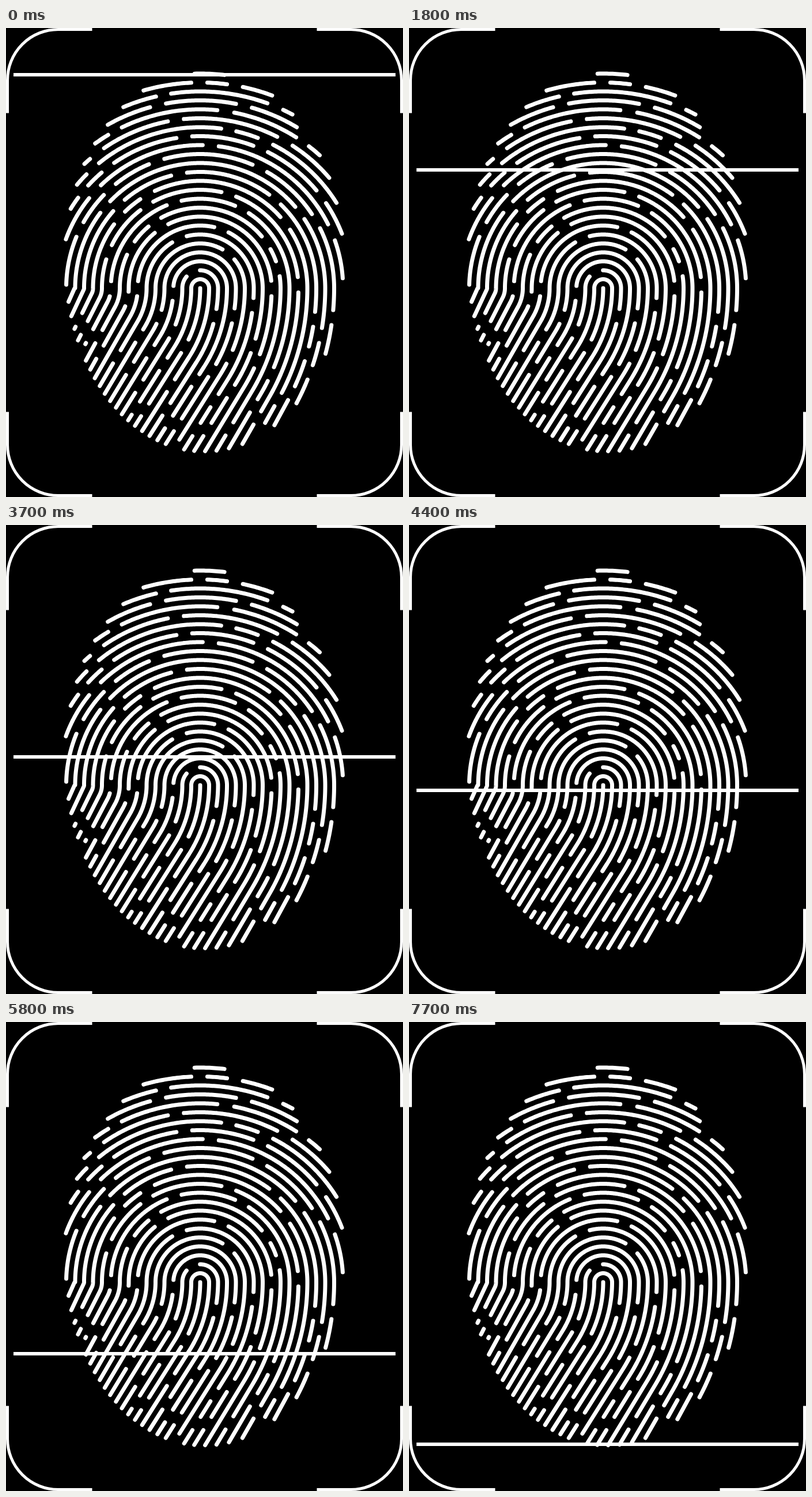
Write an HTML page with a canvas that moves like this. It is 689 px wide and 813 px high and loops after 7800 ms.

```html
<!DOCTYPE html>
<html lang="en">
<head>
<meta charset="utf-8">
<title>Fingerprint scan</title>
<style>
  html, body { margin: 0; width: 100%; height: 100%; overflow: hidden; background: #000; }
  canvas { display: block; }
</style>
</head>
<body>
<canvas id="stage" width="689" height="813"></canvas>
<script>
const ctx = document.getElementById('stage').getContext('2d');
const W = 689, H = 813, LOOP = 7800, TICK = 100;
const RAD = Math.PI / 180;
const CORE = { x: 337, y: 451 };
const BEND_X = 130, PITCH = 15.5, HALF_GAP = 13;

// Breaks in each ridge, from the core outwards. Up to 90 a value is an angle
// from the top (left is negative); past 90 it is a depth down the leg.
const breaks = [
  [191, 301],
  [-298, -222, 259],
  [-260, -165, -25, 139, 300],
  [-200, -99, 250, 322],
  [-229, -140, 138, 233, 327],
  [-173, 40, 209, 364],
  [-209, -23, 120, 285, 335],
  [-91, 20, 190, 269, 335],
  [-201, -109, -33, 91, 217],
  [-174, -60, -34.5, 55.5, 76, 334],
  [-199, -173, -91, -17, 28, 239, 294],
  [-159, -68.5, -33, 17, 88, 315],
  [-145, -49, -29.5, 52.7, 283, 335],
  [-44.4, -10.6, 40.2, 144, 204, 272],
  [-49.5, 53, 172, 236],
  [-64, -42.5, -19, 26.7, 60, 141],
  [-47.5, 4.2, 67],
  [-50.4, -37.4, -6.1, 23.5, 53],
  [-42.1, 10.3, 24.1],
  [-37.5, -8.2, 30],
  [-28.5, 8.2, 35],
  [-13.1, 13.5, 33.6],
  [-10.8, 22.4],
  [-0.3, 9.7],
  [-3.9, 9]
];

// Legs bend round a common centre, then run straight.
function legX(j, depth) {
  const r = CORE.x - BEND_X + PITCH * j;
  const a = (32.5 - 0.033 * (j - 2) ** 2) * RAD;
  const turn = r * Math.sin(a);
  return depth < turn
    ? BEND_X + Math.sqrt(r * r - depth * depth)
    : BEND_X + r * Math.cos(a) - (depth - turn) * Math.tan(a);
}

function ridgePoint(n, u) {
  const r = n * PITCH;
  if (Math.abs(u) <= 90) {
    return [CORE.x + r * Math.sin(u * RAD), CORE.y - r * Math.cos(u * RAD)];
  }
  const depth = Math.abs(u) - 90;
  return [legX(Math.sign(u) * n, depth), CORE.y + depth];
}

function inPrint([x, y]) {
  const dx = (x - 344) / 241.5;
  const dy = (y - 402) / (y < 402 ? 327 : 332);
  return dx * dx + dy * dy < 1;
}

function buildPrint() {
  const path = new Path2D();
  breaks.forEach((list, n) => {
    const gaps = list.map(u => ridgePoint(n, u));
    let run = [];
    const flush = () => {
      if (run.length > 4) {
        path.moveTo(...run[0]);
        run.slice(1).forEach(p => path.lineTo(...p));
      }
      run = [];
    };
    for (let u = n ? -430 : 90; u <= 430; u += 0.5) {
      const p = ridgePoint(n, u);
      const open = gaps.some(g => Math.hypot(p[0] - g[0], p[1] - g[1]) < HALF_GAP);
      if (!open && inPrint(p)) run.push(p);
      else flush();
    }
    flush();
  });
  return path;
}

function buildCorners() {
  const path = new Path2D();
  const l = 2.5, r = W - 2.5, t = 2.5, b = H - 2.5;
  for (const [x, sx] of [[l, 1], [r, -1]]) {
    for (const [y, sy] of [[t, 1], [b, -1]]) {
      path.moveTo(x, y + sy * 145);
      path.lineTo(x, y + sy * 88);
      path.arcTo(x, y, x + sx * 88, y, 88);
      path.lineTo(x + sx * 147, y);
    }
  }
  return path;
}

function scanY(t) {
  if (t < 800) return 81 + 73 * t / 800;
  if (t < 1600) return 154 + 75.5 * (t - 800) / 800;
  return 229.5 + 502.5 * (t - 1600) / 6100;
}

const print = buildPrint();
const corners = buildCorners();

function draw(now) {
  const t = Math.floor(now % LOOP / TICK) * TICK;
  ctx.fillStyle = '#000';
  ctx.fillRect(0, 0, W, H);
  ctx.strokeStyle = ctx.fillStyle = '#fff';
  ctx.lineJoin = 'round';
  ctx.lineCap = 'round';
  ctx.lineWidth = 7;
  ctx.stroke(print);
  ctx.lineCap = 'butt';
  ctx.lineWidth = 5;
  ctx.stroke(corners);
  ctx.fillRect(13, Math.round(scanY(t) - 3), 663, 6);
}

const start = performance.now();
function frame() {
  draw(performance.now() - start);
  requestAnimationFrame(frame);
}
frame();
</script>
</body>
</html>
```
